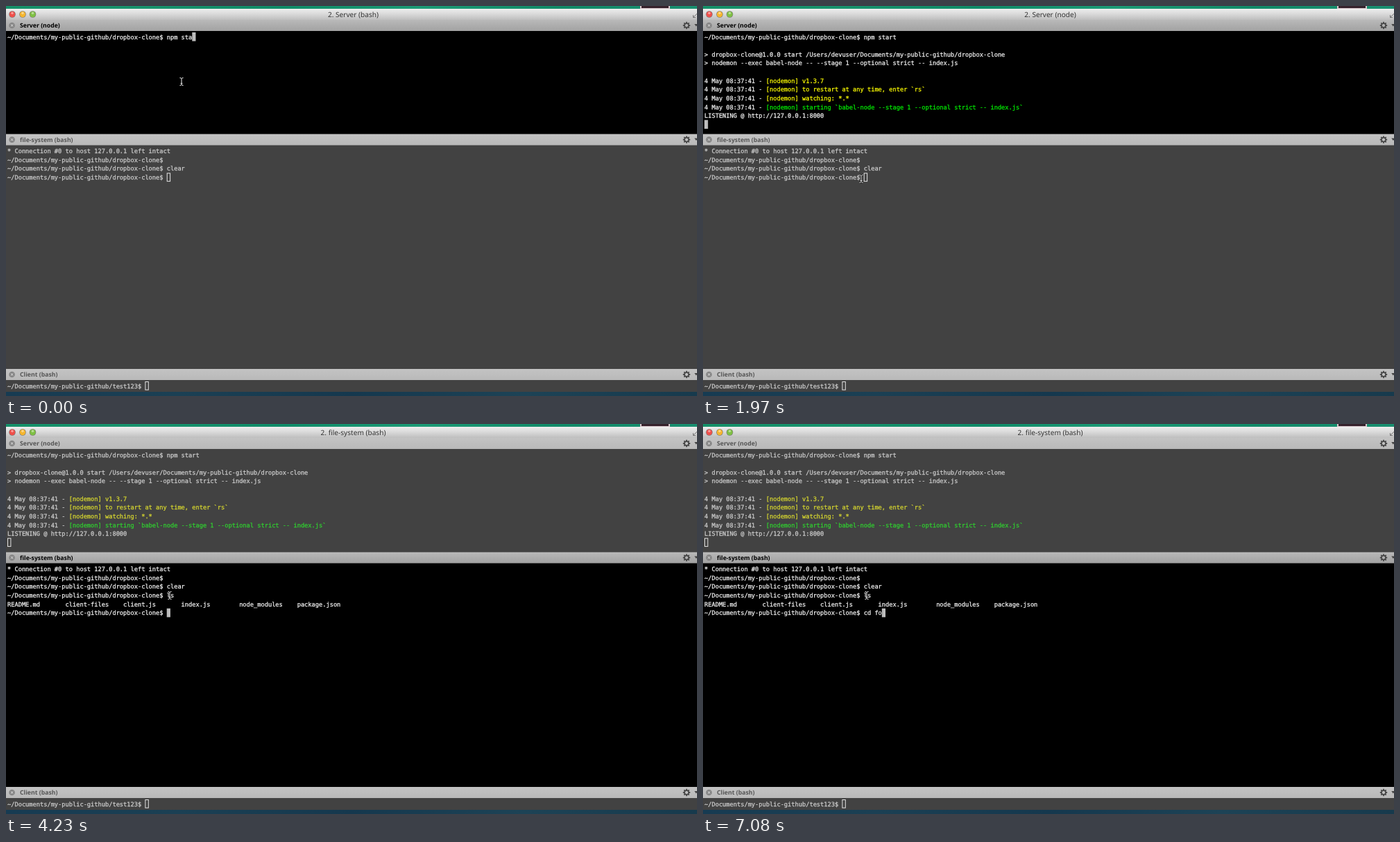
Recreate the animation shown at these times as an HTML page with a canvas. Size 996 by 562 pixels, loop 8000 ms.

```html
<!DOCTYPE html>
<html lang="en">
<head>
<meta charset="utf-8">
<title>Terminal session</title>
<style>
  html, body { margin: 0; width: 100%; height: 100%; overflow: hidden; background: #000; }
  canvas { display: block; width: 996px; height: 562px; }
</style>
</head>
<body>
<canvas id="stage" width="996" height="562"></canvas>
<script>
const ctx = document.getElementById('stage').getContext('2d');
const LOOP = 8000, W = 996;
const ROW = 12.63, LEFT = 2, CELL = 5.2, TAB = 16;
const MONO = '8.68px "DejaVu Sans Mono", monospace';
const PROMPT = '~/Documents/my-public-github/dropbox-clone$ ';
const STAMP = '4 May 08:37:41 - ';

// Step tables: [start time, value]
const titles = [[0, '2. Server (bash)'], [1070, '2. Server (node)'], [2260, '2. file-system (bash)']];
const focus = [[0, 'server'], [2110, 'files']];
const pointer = [
  [0, [253, 109]], [1070, [255, 106]], [1220, [200, 106]], [1370, [212.5, 100]],
  [1520, [263, 148]], [1670, [229, 235.5]], [1820, [229, 246]], [1970, [228, 249]],
  [2260, [228, 243]], [2440, [246, 201.5]], [2590, [242.5, 184.5]],
  [2730, [237, 212]], [2880, [236, 247]]
];
const startCommand = [[0, 'npm sta'], [150, 'npm star'], [330, 'npm start']];
const listCommand = [[0, ''], [3780, 'l'], [3930, 'ls']];
const cdCommand = [[0, ''], [6030, 'cd'], [6180, 'cd '], [6330, 'cd f'], [7080, 'cd fo']];

const at = (steps, t) => steps.findLast(([start]) => start <= t)[1];

function serverLines(t) {
  const lines = [PROMPT + at(startCommand, t)];
  if (t >= 920) lines.push('',
    '> dropbox-clone@1.0.0 start /Users/devuser/Documents/my-public-github/dropbox-clone',
    '> nodemon --exec babel-node -- --stage 1 --optional strict -- index.js', '');
  if (t >= 1220) lines.push(
    [STAMP, '[nodemon] v1.3.7', 'yellow'],
    [STAMP, '[nodemon] to restart at any time, enter `rs`', 'yellow'],
    [STAMP, '[nodemon] watching: *.*', 'yellow'],
    [STAMP, '[nodemon] starting `babel-node --stage 1 --optional strict -- index.js`', 'green']);
  if (t >= 1970) lines.push('LISTENING @ http://127.0.0.1:8000');
  if (t >= 630) lines.push('');
  return lines;
}

function fileLines(t) {
  const lines = ['* Connection #0 to host 127.0.0.1 left intact',
    PROMPT, PROMPT + 'clear', PROMPT + at(listCommand, t)];
  if (t >= 4230) {
    const names = ['README.md', 'client-files', 'client.js', 'index.js', 'node_modules', 'package.json'];
    lines.push(names.map(name => name.padEnd(16)).join(''), PROMPT + at(cdCommand, t));
  }
  return lines;
}

function rect(x, y, w, h, fill) {
  ctx.fillStyle = fill;
  ctx.fillRect(x, y, w, h);
}

function disc(x, y, r, fill) {
  ctx.fillStyle = fill;
  ctx.beginPath();
  ctx.arc(x, y, r, 0, Math.PI * 2);
  ctx.fill();
}

function stroke(color, width, ...paths) {
  ctx.strokeStyle = color;
  ctx.lineWidth = width;
  ctx.beginPath();
  for (const [first, ...rest] of paths) {
    ctx.moveTo(...first);
    rest.forEach(point => ctx.lineTo(...point));
  }
  ctx.stroke();
}

function gradient(x0, y0, x1, y1, ...colors) {
  const g = ctx.createLinearGradient(x0, y0, x1, y1);
  colors.forEach((color, i) => g.addColorStop(i / (colors.length - 1), color));
  return g;
}

function text(value, x, y, font, color, align = 'left') {
  ctx.font = font;
  ctx.fillStyle = color;
  ctx.textAlign = align;
  ctx.fillText(value, x, y);
}

// Terminal type is slightly heavier than the plain face.
function terminalText(value, x, y, color) {
  text(value, x, y, MONO, color);
  ctx.strokeStyle = color;
  ctx.lineWidth = 0.3;
  ctx.strokeText(value, x, y);
  return x + ctx.measureText(value).width;
}

function drawDesktop() {
  rect(0, 0, W, 4, gradient(0, 0, W, 0, '#159069', '#18936d', '#0f8b68', '#1c9b76', '#118a68', '#198f70'));
  rect(914, 0, 43, 4, '#d9c6cc');
  rect(916, 0, 39, 3, '#35222c');
  rect(0, 556, W, 6, gradient(0, 0, W, 0, '#173b52', '#1b4054', '#15384e', '#1d4356', '#173a4d'));
}

function drawTitleBar(title) {
  rect(0, 4, W, 16, gradient(0, 4, 0, 20, '#eeeeee', '#d8d8d8', '#bebebe'));
  [[9, '#ef4f4b'], [24, '#f5b52e'], [38.5, '#7fc044']].forEach(([x, color]) => {
    disc(x, 12, 4.8, '#777');
    disc(x, 12, 4.2, color);
    disc(x, 10.2, 1.7, 'rgba(255,255,255,.45)');
  });
  text(title, 500.5, 15.6, '10.1px "Noto Sans", sans-serif', '#333', 'center');
  stroke('#777', 1, [[990.5, 13], [990.5, 16.5], [994, 16.5]], [[990.5, 16.5], [996, 11]]);
}

function drawGear(x, y) {
  ctx.fillStyle = '#444';
  for (let i = 0; i < 8; i++) {
    ctx.save();
    ctx.translate(x, y);
    ctx.rotate(i * Math.PI / 4);
    ctx.fillRect(-0.9, -5.2, 1.8, 3);
    ctx.restore();
  }
  ctx.strokeStyle = '#444';
  ctx.lineWidth = 1.5;
  ctx.beginPath();
  ctx.arc(x, y, 3.1, 0, Math.PI * 2);
  ctx.stroke();
}

function drawTab(y, label, active) {
  const colors = active ? ['#b9b9b9', '#a2a2a2'] : ['#c3c3c3', '#b9b9b9'];
  rect(0, y, W, TAB, gradient(0, y, 0, y + TAB, ...colors));
  const mid = y + TAB / 2;
  disc(8.6, mid, 4.3, '#858585');
  stroke('#ddd', 1, [[6.9, mid - 1.7], [10.3, mid + 1.7]], [[10.3, mid - 1.7], [6.9, mid + 1.7]]);
  text(label, 20, mid + 3.2, 'bold 8.7px "Noto Sans", sans-serif', active ? '#000' : '#555');
  drawGear(981, mid);
  ctx.fillStyle = '#444';
  ctx.beginPath();
  ctx.moveTo(992.3, mid - 2);
  ctx.lineTo(997.3, mid - 2);
  ctx.lineTo(994.8, mid + 1.5);
  ctx.fill();
}

function drawPane({ y, bottom, label, lines }, active) {
  const top = y + TAB;
  const ink = active
    ? { plain: '#ececec', yellow: '#f6f600', green: '#00e600' }
    : { plain: '#c9c9c9', yellow: '#d2d230', green: '#30cc30' };
  rect(0, y, W, bottom - y, active ? '#000' : '#424242');
  drawTab(y, label, active);

  let endX = LEFT;
  lines.forEach((line, i) => {
    const [plain, colored = '', hue = 'plain'] = [].concat(line);
    const baseline = top + 11.5 + i * ROW;
    endX = terminalText(plain, LEFT, baseline, ink.plain);
    terminalText(colored, endX, baseline, ink[hue]);
  });

  const cursorY = top + 2 + (lines.length - 1) * ROW;
  if (active) {
    rect(endX, cursorY, CELL, ROW, '#bdbdbd');
  } else {
    ctx.strokeStyle = '#e4e4e4';
    ctx.lineWidth = 1;
    ctx.strokeRect(endX + 0.5, cursorY + 0.5, CELL - 0.8, ROW - 1);
  }
}

function drawPointer([x, y]) {
  const beam = [
    [[x - 2.5, y - 5.5], [x - 0.8, y - 5.2], [x, y - 4.2], [x, y + 4.2], [x - 0.8, y + 5.2], [x - 2.5, y + 5.5]],
    [[x + 2.5, y - 5.5], [x + 0.8, y - 5.2], [x, y - 4.2]],
    [[x + 2.5, y + 5.5], [x + 0.8, y + 5.2], [x, y + 4.2]],
    [[x - 1.3, y + 2.5], [x + 1.3, y + 2.5]]
  ];
  stroke('#111', 2.2, ...beam);
  stroke('#e8e8e8', 1, ...beam);
}

function draw(t) {
  const active = at(focus, t);
  ctx.textRendering = 'geometricPrecision';
  ctx.lineJoin = 'miter';
  drawDesktop();
  drawTitleBar(at(titles, t));
  drawPane({ y: 20, bottom: 185, label: 'Server (node)', lines: serverLines(t) }, active === 'server');
  drawPane({ y: 184.6, bottom: 523, label: 'file-system (bash)', lines: fileLines(t) }, active === 'files');
  drawPane({ y: 523, bottom: 556, label: 'Client (bash)',
    lines: ['~/Documents/my-public-github/test123$ '] }, false);
  drawPointer(at(pointer, t));
}

const began = performance.now();
function tick() {
  draw((performance.now() - began) % LOOP);
  requestAnimationFrame(tick);
}
tick();
</script>
</body>
</html>
```
